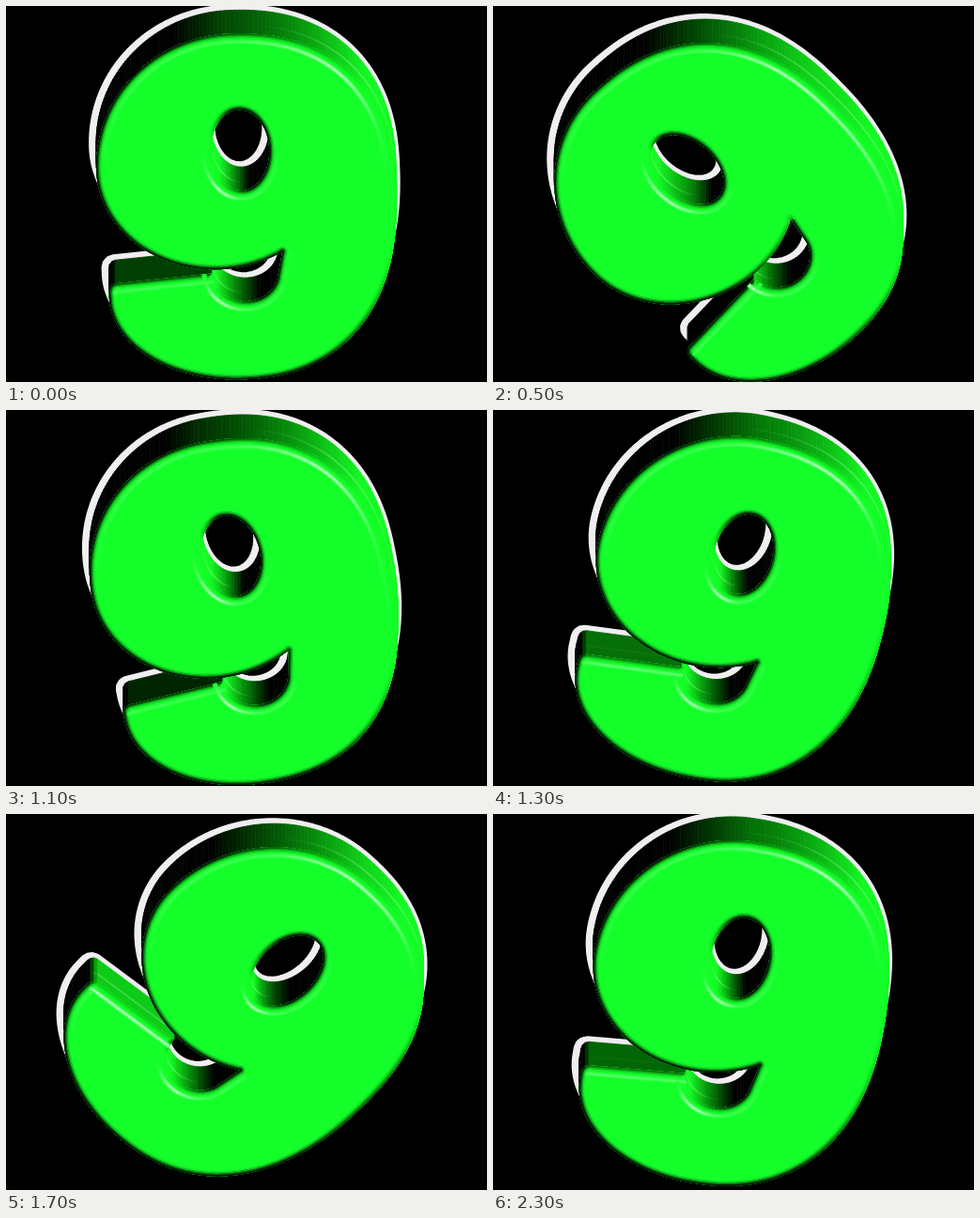
Animation, 512 px wide and 400 px high, one loop 2.4 s. Source, as an HTML page with a canvas:

```html
<!DOCTYPE html>
<html lang="en">
<head>
<meta charset="utf-8">
<title>Rocking nine</title>
<style>
html, body { margin: 0; width: 100%; height: 100%; overflow: hidden; background: #000; }
canvas { display: block; }
</style>
</head>
<body>
<canvas id="c" width="512" height="400"></canvas>
<script>
const ctx = document.getElementById('c').getContext('2d');
const LOOP = 2400, STEP = 100;
const PIVOT = { x: 257, y: 216 }, STRETCH = 1.07, DEPTH = 25;
const FACE = [20, 255, 42], SHINE = [222, 255, 226];
const RAD = Math.PI / 180;

// Part of an oval in degrees; a power below 1 makes it squarer.
function arc(cx, cy, rx, ry, from, to, power = 1) {
  const bend = v => Math.sign(v) * Math.abs(v) ** power;
  const n = Math.ceil(Math.abs(to - from) * RAD * Math.max(rx, ry) / 4);
  return Array.from({ length: n + 1 }, (_, i) => {
    const a = (from + (to - from) * i / n) * RAD;
    return [cx + rx * bend(Math.cos(a)), cy + ry * bend(Math.sin(a))];
  });
}

const outline = [
  ...arc(245, 200, 171, 171, -90, 0, 0.87),   // right shoulder
  ...arc(245, 200, 171, 197, 0, 90, 0.87),    // right side to the foot
  ...arc(245, 305, 139, 92, 90, 180),         // foot to the tail
  ...arc(114, 298, 8, 8, 180, 265),           // tip of the tail
  ...arc(252, 283, 35, 31, 180, 15),          // notch
  ...arc(225, 170, 127, 109, 58, 180),        // underside of the bowl
  ...arc(245, 170, 147, 141, 180, 270)        // left shoulder
];
const hole = arc(252, 153, 31, 43, 360, 0);

const clamp = v => Math.max(0, Math.min(1, v));
const mix = (a, b, k) => a.map((v, i) => v + (b[i] - v) * k);
const css = c => `rgb(${c.map(Math.round)})`;

// Light comes from the right; sides that face down stay dark.
function wallColor({ nx, ny }) {
  const k = clamp(0.34 + 0.8 * nx - 0.8 * Math.max(0, ny));
  return [20 * k * k, 250 * k, 36 * k * k];
}

const gloss = ({ nx, ny }) =>
  0.9 * clamp(0.6 * nx - 0.8 * ny) ** 8 + 0.25 * clamp(-0.5 * nx - 0.86 * ny) ** 3;

function turn(loop, angle) {
  const co = Math.cos(angle), si = Math.sin(angle);
  return loop.map(([px, py]) => {
    const x = (px - PIVOT.x) / STRETCH, y = py - PIVOT.y;
    return [PIVOT.x + (x * co - y * si) * STRETCH, PIVOT.y + x * si + y * co];
  });
}

// Sides of a loop with their outward normals.
function edges(loop) {
  return loop.map((a, i) => {
    const b = loop[(i + 1) % loop.length];
    const dx = b[0] - a[0], dy = b[1] - a[1], d = Math.hypot(dx, dy);
    return { a, b, d, nx: dy / d, ny: -dx / d };
  }).filter(e => e.d > 0.05);
}

function shapePath(loops, dx, dy) {
  const p = new Path2D();
  for (const loop of loops) {
    loop.forEach(([x, y], i) => i ? p.lineTo(x + dx, y + dy) : p.moveTo(x + dx, y + dy));
    p.closePath();
  }
  return p;
}

function line({ a, b }, dx, dy, width, color) {
  ctx.lineWidth = width;
  ctx.strokeStyle = css(color);
  ctx.beginPath();
  ctx.moveTo(a[0] + dx, a[1] + dy);
  ctx.lineTo(b[0] + dx, b[1] + dy);
  ctx.stroke();
}

function wall(e) {
  const { a, b } = e;
  ctx.fillStyle = ctx.strokeStyle = css(wallColor(e));
  ctx.lineWidth = 0.8;
  ctx.beginPath();
  ctx.moveTo(a[0], a[1]);
  ctx.lineTo(b[0], b[1]);
  ctx.lineTo(b[0], b[1] - DEPTH);
  ctx.lineTo(a[0], a[1] - DEPTH);
  ctx.closePath();
  ctx.fill();
  ctx.stroke();
}

function draw(t) {
  const phase = t / LOOP * 2 * Math.PI + 2 * RAD;
  const angle = (-0.7 - 44.5 * Math.sin(phase)) * RAD;
  const loops = [outline, hole].map(l => turn(l, angle));
  const sides = loops.flatMap(edges);
  const tops = sides.filter(e => e.ny < 0.02);

  ctx.fillStyle = '#000';
  ctx.fillRect(0, 0, 512, 400);
  ctx.lineJoin = ctx.lineCap = 'round';

  // pale rim around the back
  const back = shapePath(loops, -2, -DEPTH);
  ctx.fillStyle = ctx.strokeStyle = '#f0eef0';
  ctx.lineWidth = 12;
  ctx.fill(back, 'evenodd');
  ctx.stroke(back);

  tops.forEach(wall);
  for (const e of tops) {
    const g = clamp(0.7 * e.nx - 0.7 * e.ny) ** 8;
    if (g > 0.1) line(e, 0, -9, 1.5, mix(wallColor(e), SHINE, 0.3 * g));
  }

  const front = shapePath(loops, 0, 0);
  ctx.fillStyle = css(FACE);
  ctx.fill(front, 'evenodd');
  ctx.save();
  ctx.clip(front, 'evenodd');
  // rounded edge, shaded in layers
  for (const [width, k] of [[11, 0.1], [8, 0.3], [5.5, 0.6], [3, 0.9]])
    for (const e of sides) line(e, 0, 0, width, mix(FACE, wallColor(e), k));
  // gloss along the crease
  for (const [width, k] of [[5, 0.25], [3.2, 0.5], [1.6, 0.85]])
    for (const e of tops) {
      const g = gloss(e);
      if (g > 0.04) line(e, -e.nx * 9, -e.ny * 9, width, mix(FACE, SHINE, g * k));
    }
  ctx.restore();
}

let shown = -1;
const start = performance.now();
function tick() {
  const step = Math.floor((performance.now() - start) % LOOP / STEP);
  if (step !== shown) draw((shown = step) * STEP);
  requestAnimationFrame(tick);
}
tick();
</script>
</body>
</html>
```
